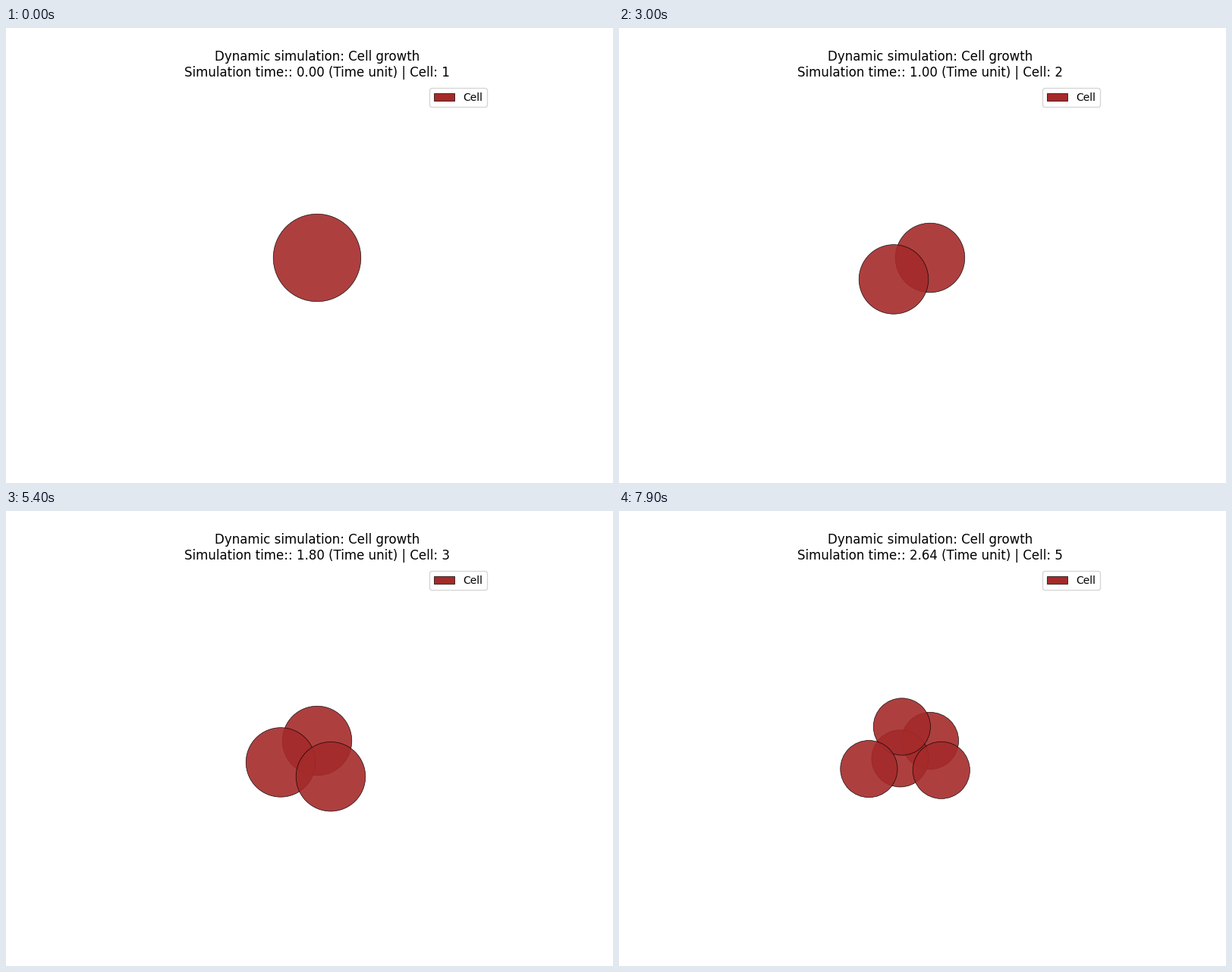
Animation of 800x600 px, one loop 8000 ms. Source, as a matplotlib script:

```python
import numpy as np
import matplotlib.pyplot as plt
from matplotlib.animation import FuncAnimation
from matplotlib.patches import Circle, Patch

FRAMES, INTERVAL = 80, 100
DT = 0.01
STEPS = np.linspace(0, 1000, 300).astype(int)

# Cell centres in units of the cell radius, in order of birth
CENTRES = np.array([(0, 0), (-1.049, -0.621), (0.393, -1.032),
                    (-0.988, 0.494), (-2.144, -0.987)])
MARGIN = 4
STYLE = dict(facecolor="brown", edgecolor="black", linewidth=0.5)

plt.rcParams["font.family"] = "DejaVu Sans"
fig, ax = plt.subplots(figsize=(8, 6), dpi=100)
ax.set_aspect("equal")
ax.axis("off")

cells = [ax.add_patch(Circle(c, 1, alpha=0.9, **STYLE)) for c in CENTRES]
ax.legend(handles=[Patch(label="Cell", **STYLE)], loc="upper right")
title = ax.set_title("")


def population(t):
    """Doubling once per time unit, to the nearest whole cell."""
    return min(int(round(2 ** t)), len(CENTRES))


def update(i):
    t = STEPS[i] * DT
    n = population(t)
    for k, cell in enumerate(cells):
        cell.set_visible(k < n)
    lim = MARGIN + np.abs(CENTRES[:n]).max()
    ax.set_xlim(-lim, lim)
    ax.set_ylim(-lim, lim)
    title.set_text("Dynamic simulation: Cell growth\n"
                   f"Simulation time:: {t:.2f} (Time unit) | Cell: {n}")
    return [*cells, title]


anim = FuncAnimation(fig, update, frames=FRAMES, interval=INTERVAL,
                     repeat=True, repeat_delay=0, blit=False)
plt.show()
```
